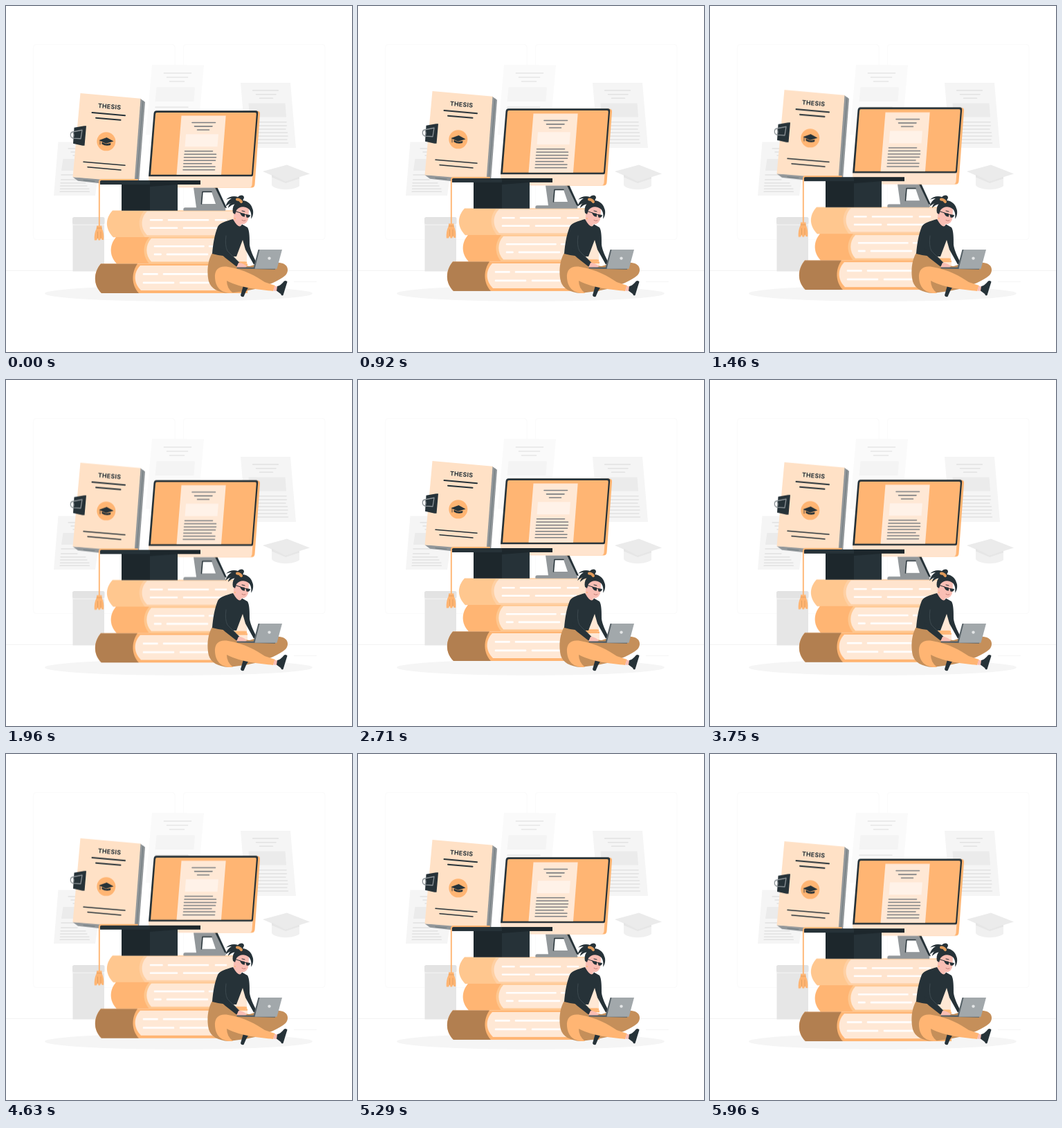
Recreate the animation shown at these times as an HTML page. Size 500 by 500 pixels, loop 6 s.

```html
<!DOCTYPE html>
<html lang="en">
<head>
<meta charset="utf-8">
<title>Thesis</title>
<style>
  html, body { margin: 0; width: 100%; height: 100%; overflow: hidden; background: #fff; }
  svg { display: block; width: 100vw; height: 100vh; }
  .ink { fill: #263238; }
  .deep { fill: #1d272c; }
  .orange { fill: #ffb573; }
  .page { fill: #ffe8d5; }
  .gray { fill: #92979a; }
  .skin { fill: #f9beb4; }
  .line { fill: none; stroke-linecap: round; stroke-linejoin: round; }
  .label { font: 700 8.8px Inter, "Open Sans", sans-serif; letter-spacing: .25px; text-anchor: middle; }
</style>
</head>
<body>
<svg viewBox="0 0 500 500">
  <!-- room -->
  <g fill="none" stroke="#fafafa">
    <rect x="39.5" y="55.5" width="204.5" height="282" rx="4"/>
    <rect x="256.5" y="55.5" width="204.5" height="282" rx="4"/>
    <path stroke="#f0f0f0" stroke-width=".8" d="M0 382.4H500"/>
    <path stroke="#f3f3f3" stroke-width=".8" d="M416 398.4H449"/>
  </g>

  <!-- loose papers -->
  <path fill="#fafafa" d="M211 85L286 85.5 277 186H202z"/>
  <path fill="#f4f4f4" d="M217.500 117.500H273L271.500 138H215.500z"/>
  <path class="line" stroke="#e6e6e6" stroke-width="1.500" d="M228.500 97H267.500M232.500 103H262.500M236.500 109H257.500M216 146.300H263"/>

  <path fill="#f5f5f5" d="M339 111H411L419 205H347z"/>
  <path fill="#ebebeb" d="M350.500 140.500H403.500L405 160.500H352z"/>
  <path class="line" stroke="#e2e2e2" stroke-width="1.500" d="M356.500 122H393.500M361.500 127.800H390M366.500 133.300H385.500M355 167.700H405M355 173H405.500M356 178H404M356 183H406.500M357 188H407M357 193H406M358 198H407.500"/>

  <path fill="#f5f5f5" d="M75.500 196.500H140L129 274H69z"/>
  <path fill="#ebebeb" d="M82.500 221H125L122 238H80z"/>
  <path class="line" stroke="#e2e2e2" stroke-width="1.400" d="M90 206H120M94 211H118M97 216H114M80 244H118M79.500 251H103M79 255.700H115M78.500 260H117M78.500 264.200H120M78 268.300H120.500"/>

  <!-- pale cap -->
  <path fill="#f0f0f0" d="M384 243V259C390 267 416 267 424 260V246z"/>
  <path fill="#ebebeb" d="M371 239L406 229.500 439 242.500 404 253.500z"/>
  <path fill="#e6e6e6" d="M384 243.500L404 253.500 424 246.800V249.500L404 256 384 247.500z"/>

  <!-- jar -->
  <rect x="96.500" y="314" width="45.500" height="69.500" fill="#e6e6e6"/>
  <path fill="#f0f0f0" d="M96.500 315H142V317H96.500z"/>
  <rect x="96" y="305" width="46.500" height="10.500" rx="2.500" fill="#e3e3e3"/>

  <ellipse cx="249.500" cy="415.500" rx="193.500" ry="11.300" fill="#f5f5f5"/>

  <g id="stack">
    <!-- books -->
    <path fill="#ffc78f" d="M154 295.300H330V334H155C143 322 143 307 154 295.300z"/>
    <path fill="#ffd0a3" d="M200 295.300H330V334H201C190 322 190 306 200 295.300z"/>
    <path fill="#ffe4ce" d="M204 296.500H330V331H204C194 321 194 306 204 296.500z"/>
    <path class="orange" d="M159 333.700H346V372.200H160C149 361 149 345 159 333.700z"/>
    <path fill="#ffc78f" d="M207 333.700H346V372.200H207C197 361 197 345 207 333.700z"/>
    <path class="page" d="M210 335.500H348V369.200H210C201 360 201 345 210 335.500z"/>
    <path class="orange" d="M300 369.200H348V372.200H300z"/>
    <path class="orange" d="M137 372.200H349V414.700H138C126 403 126 385 137 372.200z"/>
    <path fill="#b27f50" d="M137 372.200H190C181 385 181 403 192 414.700H138C126 403 126 385 137 372.200z"/>
    <path class="page" d="M194 374.800H349V410.700H195C184 400 184 385 194 374.800z"/>
    <path class="line" stroke="#fff" stroke-width="2.700" d="M209 309H225.500M235 309H292M303 309H318M209 320.500H247M257 320.500H315M215 347H285.500M294 347H310M215 358.700H223.500M233 358.700H291M199 387.200H218.500M228 387.200H305M199 399.700H242M252 399.700H305"/>

    <!-- monitor -->
    <path class="ink" d="M300 261H305L319 291.500H310z"/>
    <path class="gray" fill-rule="evenodd" d="M271 262H302L316 291Q318 292.500 317 295.500H256.500Q255.500 291 259 291H275zM284 268.200L282.500 285.700H303L297 268.200z"/>
    <path class="line" stroke="#263238" stroke-width="1.500" d="M297 268.200H284L282.500 285.700"/>
    <path class="orange" d="M218 151.500H364Q367.500 152 367 156L359.500 258Q359 262.200 355 262.200H300L340 160z"/>
    <path fill="#ffe4ce" d="M206 245H356.500L355.500 258Q355 262.200 351 262.200H206z"/>
    <path class="ink" d="M217.500 151H361Q364.500 151 364.200 154.500L357 244Q356.800 246 355 246H206L213.500 155Q214 151 217.500 151z"/>
    <path class="orange" d="M218 153.800H360Q362 153.800 361.800 156L355 242.500Q354.800 243.500 353.500 243.500H209L216 156Q216.200 153.800 218 153.800z"/>
    <path class="page" d="M253.500 158.300H317.700L311 243.500H246.500z"/>
    <path fill="#fff2e8" d="M260 184.900H307L305.500 203H258.500z"/>
    <path class="line" stroke="#7c8083" stroke-width="1.600" d="M269 168.200H302.500M272.500 173.600H298M276.500 178.700H293.500M258.500 209.500H298.500M258 214H303.500M257.500 218.500H303.500M257.200 223H302.500M256.800 227.500H297M256.500 232H302M256 236.500H301.500"/>

    <!-- bound thesis -->
    <path class="gray" d="M194 133.500L201 138.500 192 256 184 255z"/>
    <path class="line" stroke="#6f7b80" stroke-width="1" d="M198 137L189 252"/>
    <path class="gray" d="M96.500 247L104 252.500 140 256.500 190 256V252z"/>
    <path class="line" stroke="#6f7b80" stroke-width="1" d="M112 251.500L128 253"/>
    <path fill="#ffe1c6" d="M107.500 125.800L194.500 133.500 185.500 254.500 96.500 247z"/>
    <text class="label ink" transform="translate(149.300 148.200) rotate(4.800)">THESIS</text>
    <g class="line" stroke="#263238">
      <path stroke-width="2" d="M124.500 153.800L172 158M130 161.400L165.500 164.500"/>
      <path stroke-width="1.500" d="M112 225L172 230M118 232.400L166 236.700"/>
    </g>
    <circle class="orange" cx="144.800" cy="195.600" r="13.500"/>
    <path class="ink" d="M134.500 193.700L145.500 189.700 155.500 195.200 144.500 198.400zM138.500 196.200L144.500 199 151.500 197.700 151 200.700Q144 202.700 138.500 199.200z"/>
    <path class="line" stroke="#263238" stroke-width=".8" d="M136 194.200V199.700"/>
    <path class="ink" d="M98.500 175.500L113 173H116L113.500 201.500H110.500L97 198.500z"/>
    <path class="line" stroke="#8d9498" stroke-width="1.300" d="M110 179L97 181.500Q93.300 182 93.300 186 93.300 190 97 190.800L108 191.500zM97 182Q99 186.500 97 190.500"/>

    <!-- graduation cap -->
    <path class="deep" d="M167 254H208V295.500H167z"/>
    <path class="ink" d="M208 254H248V295.500H208z"/>
    <path class="ink" d="M136 251.700H281V257.700H136z"/>
    <path class="deep" d="M208 251.700H281V257.700H248L208 260.700z"/>
    <path class="line" stroke="#ffb573" stroke-width="1.900" d="M190 250.800H138Q134.800 250.800 134.800 254.500V318"/>
    <path class="orange" d="M131 317.200H138.500V320.700Q142 328 141.200 337.700H138.500L137.500 335 136 338.200H133.500L132.500 335 131 338.200H127.800Q127 328 131 320.700z"/>
    <path class="line" stroke="#d99557" stroke-width=".7" d="M131 320.700H138.500M132.500 326V335M137 326V335"/>
  </g>

  <!-- reader: legs -->
  <path fill="#c58f5a" d="M298 357C291 368 290 386 293 398 296 408 306 414 322 415L345 412 360 409C378 404 395 397 404 389 409 383 408 375 400 372 388 368 365 371 352 376L332 374 328 361z"/>
  <path class="ink" d="M343 404L351 405 347 412 343.500 420Q340 421 339 418z"/>
  <path class="orange" d="M302 393C301 380 309 375 321 377 345 381 362 391 374 399L389 404 386 412C368 410 340 408 319 397Q319 408 328 415C310 416 303 406 302 393z"/>
  <path class="skin" d="M388 404.500L393 405.500 391.500 412 386 411.500z"/>
  <path class="ink" d="M392 405Q397 404 402 397.500 405 396 406.500 398.500L400.500 418Q398 419.500 397 416L391 411.500z"/>

  <!-- reader: body -->
  <path class="skin" d="M329 304L340 313 339 323 328 317z"/>
  <path class="ink" d="M328 308C318 311 309 313 306 319 301 331 299 346 298 358 309 361 322 362 333 362L342 338 346 352 358 373.500 362 371C357 361 353 353 352 345 352 335 352 325 349 320L341 315.500Q337 324 328 308z"/>
  <path class="ink" d="M309 350Q310 359 317 364L333 376.500 338 371.500 324 357z"/>
  <path class="line" stroke="#47545a" stroke-width=".7" d="M318 332Q316 346 320 354L337 371"/>
  <path class="skin" d="M336 371Q343 371 348 376.500L346 378H333z"/>

  <!-- laptop -->
  <path fill="#566167" d="M333 377.500H360L389 379V380.800L334 379.500z"/>
  <path fill="#566167" d="M364.500 352H368L361 379.500 357.500 378.500z"/>
  <path fill="#a2a8ab" d="M366.500 352H399L391.500 379.800H359.500z"/>
  <circle cx="380.500" cy="364.600" r="2.200" fill="#e3e5e6"/>

  <!-- reader: head -->
  <path class="skin" d="M329 293Q340 285 351 293L350.500 306Q349 315 341 315.500 331 314 329 303z"/>
  <path class="ink" d="M328 299C326 290 331 281 342 281 351 282 355 288 356 292.500 358 296 357.500 304 354 307.500 355 301 354 297 351 293.500 344 288 337 290 333 295L331 301z"/>
  <path class="ink" d="M336 286C328 286 325 288 321 292 321 289 323 286 325 285 321 287 319 288 317 290 319 284 322 280 326 278 322 278 320 279 318 280 322 275 330 274 335 276 339 272 344 273 344 277L341 284z"/>
  <path class="line" stroke="#e09a5a" stroke-width="4" d="M334 279.500Q338 279.500 340 283"/>
  <path class="ink" d="M338 298.500L345 300V304.500Q340 305 338 298.500zM346.500 301L353 302Q352 307 347.500 305.500z"/>
  <path class="line" stroke="#263238" stroke-width="1" d="M331 296.500L339 299M344 301L348 302M341 296L345 297"/>
  <path class="line" stroke="#b36b64" stroke-width=".8" d="M341 309.500Q343.500 311.300 346 310"/>
  <circle class="orange" cx="331" cy="307" r="1"/>
</svg>
<script>
  const LOOP = 6000;
  const LEAD = 1000 / 24;
  const REST = 0.4;
  const RISE = 10;
  const lift = y => ({ transform: `translateY(${y}px)` });

  document.getElementById("stack").animate(
    [REST, REST - RISE, REST].map(lift),
    { duration: LOOP, delay: -LEAD, iterations: Infinity, easing: "linear" }
  );
</script>
</body>
</html>
```
